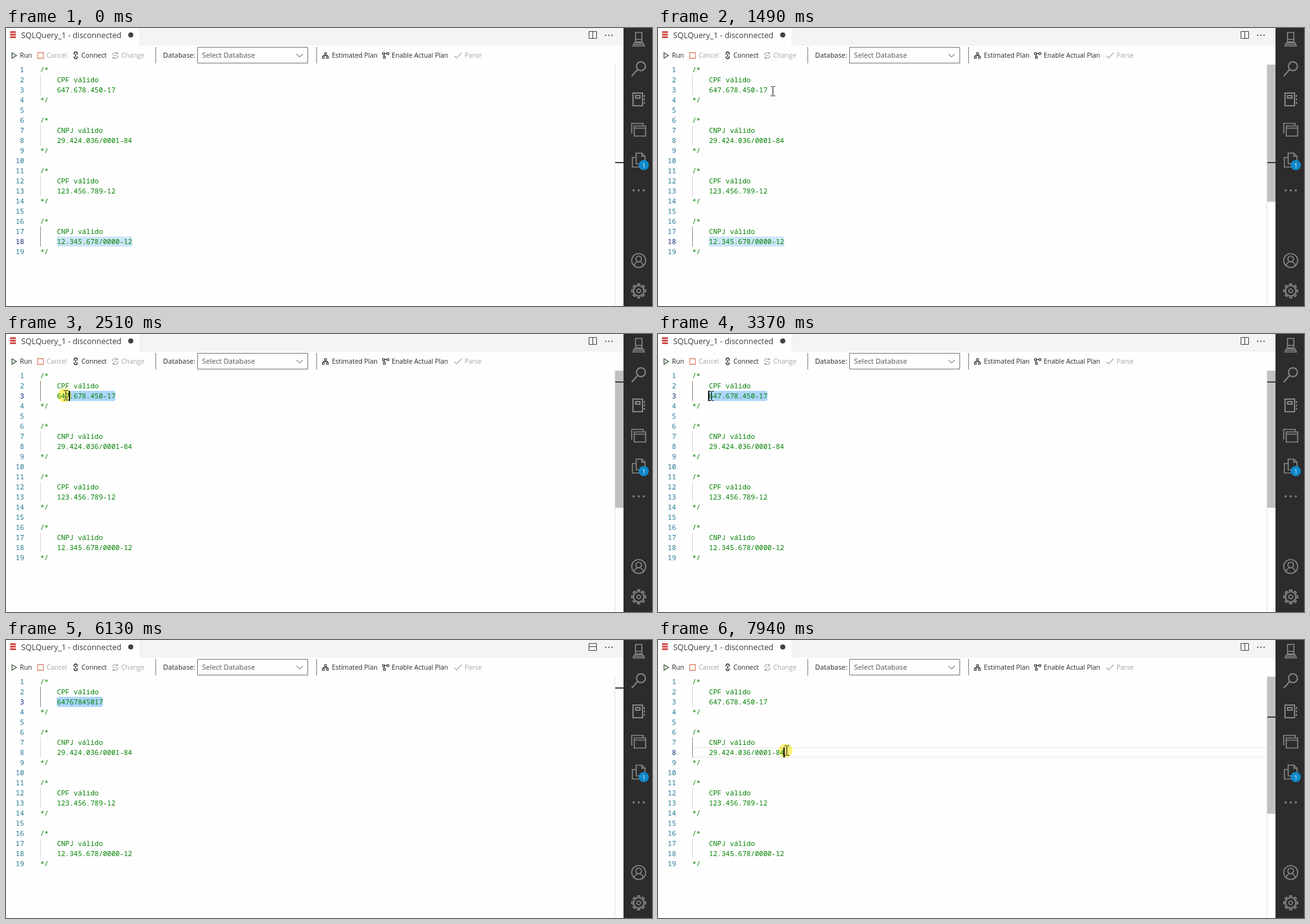
These frames come from a looping animation (1020x440 px, 8000 ms). An HTML page with a canvas:

```html
<!DOCTYPE html>
<html lang="pt">
<head>
<meta charset="utf-8">
<title>SQL editor</title>
<style>
html, body { margin: 0; width: 100%; height: 100%; overflow: hidden; background: #fefefe; }
canvas { display: block; }
</style>
</head>
<body>
<canvas id="stage" width="1020" height="440"></canvas>
<script>
const ctx = document.getElementById('stage').getContext('2d');
const LOOP = 8000, LEFT = 80.4, CHAR = 6.6, END_COL = 14;
const UI = '"Open Sans", "Noto Sans", sans-serif';
const MONO = '11px "Noto Sans Mono", "DejaVu Sans Mono", monospace';
const TIME = { enter: 460, click: 1710, drag: 1900, dragEnd: 2650, release: 3110,
  strip: 4430, leave: 5450, alt: 5860, restore: 6600, altUp: 6800, back: 7060, click2: 7940 };
const DOTTED = '647.678.450-17', PLAIN = '64767845017';
const BLOCKS = [['CPF', DOTTED], ['CNPJ', '29.424.036/0001-84'],
  ['CPF', '123.456.789-12'], ['CNPJ', '12.345.678/0000-12']];

const PATHS = [
  [[460, 255, 374], [700, 225, 250], [950, 200, 140], [1220, 188, 104], [1490, 181, 100],
   [1580, 180, 100], [1710, 174, 99], [1860, 174, 98], [1970, 162, 99], [2040, 150, 98],
   [2510, 94, 97], [2650, 82, 97], [3370, 84, 98], [3510, 89, 106], [4650, 89, 106],
   [4910, 88, 109], [5240, 88, 109], [5310, 105, 200], [5380, 125, 335], [5450, 125, 335]],
  [[7060, 205, 432], [7200, 208, 340], [7400, 206, 225], [7610, 203, 175], [8000, 203, 175]]
];

const between = (t, a, b) => t >= a && t < b;
const clamp = (v, lo, hi) => Math.min(hi, Math.max(lo, v));
const rowTop = line => 58 + (line - 1) * 16;
const rulerY = line => 58 + (line - 1) * 9.1;

function pointerAt(t) {
  for (const path of PATHS) {
    for (let i = 1; i < path.length; i++) {
      const [t0, x0, y0] = path[i - 1], [t1, x1, y1] = path[i];
      if (between(t, t0, t1)) {
        const k = (t - t0) / (t1 - t0);
        return [x0 + (x1 - x0) * k, y0 + (y1 - y0) * k];
      }
    }
  }
  return null;
}

function box(x, y, w, h, color) {
  ctx.fillStyle = color;
  ctx.fillRect(x, y, w, h);
}

function rounded(x, y, w, h, color, r = 3) {
  ctx.fillStyle = color;
  ctx.beginPath();
  ctx.roundRect(x, y, w, h, r);
  ctx.fill();
}

function disc(x, y, r, color) {
  ctx.fillStyle = color;
  ctx.beginPath();
  ctx.arc(x, y, r, 0, 7);
  ctx.fill();
}

function stroke(d, color, width = 1, dx = 0, dy = 0) {
  ctx.save();
  ctx.translate(dx, dy);
  ctx.strokeStyle = color;
  ctx.lineWidth = width;
  ctx.stroke(new Path2D(d));
  ctx.restore();
}

function text(str, x, y, color, font, align = 'left') {
  ctx.font = font;
  ctx.fillStyle = color;
  ctx.textAlign = align;
  ctx.fillText(str, x, y);
}

const label = (str, x, color, size = 10.4) => text(str, x, 47, color, `${size}px ${UI}`);

function drawTabs(t) {
  box(0, 0, 975, 28, '#f4f4f4');
  box(0, 0, 211, 28, '#fefefe');
  box(211, 0, 1, 28, '#ececec');
  for (const y of [5, 9, 13]) rounded(6, y, 10, 3, '#d2504c', 1.5);
  text('SQLQuery_1 - disconnected', 24, 16, '#3c3c3c', `12.4px ${UI}`);
  disc(197, 11, 4, '#424242');
  stroke('M920.5 5.5h12v11h-12z', '#424242');
  stroke(between(t, TIME.alt, TIME.altUp) ? 'M920 10.5h13' : 'M926.5 5v12', '#424242');
  for (const x of [947, 952, 957]) disc(x, 11.5, 1.1, '#424242');
}

function drawToolbar() {
  const dark = '#2a2a2a', pale = '#a6a6a6';
  stroke('M9.5 39.2L16.5 43.5L9.5 47.8z', '#3f5a3f', 1.3);
  label('Run', 22, dark);
  stroke('M50 39h9v9h-9z', '#df8670', 1.3);
  label('Cancel', 64, pale);
  stroke('M107.5 42v-1.5a2.5 2.5 0 0 1 5 0v1.5M107.5 45v1a2.5 2.5 0 0 0 5 0v-1M110 41v5', dark, 1.3);
  label('Connect', 119, dark);
  stroke('M168 43a4.5 4.5 0 0 1 8-2.5v-2.5M176 40.5h-3M177 44a4.5 4.5 0 0 1-8 2.5v2.5M169 46.5h3M170 43.5h5', pale, 1.2);
  label('Change', 182, pale);
  stroke('M236.5 30v26M490.5 30v26', '#7c7c7c');
  label('Database:', 248, dark, 10.9);
  stroke('M302.5 30.5h174v25h-174z', '#767676');
  label('Select Database', 309.5, '#555', 11.3);
  stroke('M458.5 41l5 5l5-5', '#444');
  stroke('M503 39h3v3h-3zM499.5 45h3v3h-3zM506 45h3v3h-3zM504.5 42v2M501 45v-1.5h6.5v1.5', dark, 1.1);
  label('Estimated Plan', 514.5, dark);
  stroke('M594.5 39h3v3h-3zM601.5 39h3v3h-3zM596 45h3v3h-3zM598 40.5h3M596.5 42l1 3', dark, 1.1);
  label('Enable Actual Plan', 609, dark);
  stroke('M708 44l3.5 3.5l8-8.5', pale, 1.1);
  label('Parse', 724, pale);
}

function drawSidebar() {
  const gray = '#858585';
  const icon = (d, x, y, w = 1.7) => stroke(d, gray, w, x, y);
  box(975, 0, 45, 440, '#2c2c2c');
  icon('M-5-11h10v15h-10zM-9 10.5h18l-2-5h-14zM-5 0h10M-7 8h14', 999, 18);
  icon('M10.5-4.5a7 7 0 1 1-14 0a7 7 0 1 1 14 0zM-1.5.5L-11 11', 999, 65, 2);
  icon('M-9-10h15v20h-15zM-5-6h7v4h-7zM9-7v3M9-1.5v3M9 4v3', 999, 113, 2);
  icon('M-11 6v-16h18v3M-7-6h18v16h-18zM-7-2.5h18', 999, 161);
  icon('M-4-11h9l5 5v12h-14zM5-11v5h5M-4-4h-6v15h11v-5', 999, 209);
  disc(1007, 217, 8, '#1089cb');
  text('1', 1007, 220.5, '#fff', `9px ${UI}`, 'center');
  for (const x of [991, 999, 1007]) disc(x, 257, 1.7, gray);
  icon('M11 0a11 11 0 1 1-22 0a11 11 0 1 1 22 0zM4.5-2.5a4.5 4.5 0 1 1-9 0a4.5 4.5 0 1 1 9 0zM-7 8c1-8 13-8 14 0', 999, 368);
  ctx.save();
  ctx.translate(999, 416);
  for (let i = 0; i < 8; i++) {
    stroke('M-2-8l.6-3h2.8l.6 3', gray, 1.8);
    ctx.rotate(Math.PI / 4);
  }
  ctx.restore();
  icon('M8 0a8 8 0 1 1-16 0a8 8 0 1 1 16 0zM3 0a3 3 0 1 1-6 0a3 3 0 1 1 6 0z', 999, 416);
}

// Selection follows the pointer with a small delay.
function editorState(t) {
  const line = t < TIME.click ? 18 : t < TIME.click2 ? 3 : 8;
  const value = between(t, TIME.strip, TIME.restore) ? PLAIN : DOTTED;
  let col = END_COL;
  if (between(t, TIME.drag, TIME.dragEnd)) {
    col = clamp(Math.round((pointerAt(t - 60)[0] - LEFT) / CHAR), 0, END_COL);
  } else if (between(t, TIME.dragEnd, TIME.click2)) {
    col = 0;
  }
  return { line, value, col };
}

function caretVisible(t) {
  if (t < TIME.click) return false;
  if (t < 3470 || t >= TIME.click2) return true;
  return [[3970, 4910], [5450, 6000], [6460, 7060]].some(([a, b]) => between(t, a, b));
}

function drawHighlights({ line, value, col }) {
  if (line === 18) rounded(LEFT - .4, 330, 119.5, 16, '#cde6f8');
  if (line === 8 || (line === 3 && col === END_COL)) {
    ctx.strokeStyle = '#e4e4e4';
    ctx.lineWidth = 1;
    ctx.strokeRect(54.5, rowTop(line) + .5, 907, 15);
  }
  if (line !== 3 || col === END_COL) return;
  const mark = (row, c) => rounded(LEFT + c * CHAR, rowTop(row), CHAR, 16, '#e2f0fb');
  if (col === END_COL - 1) {
    mark(3, 2);
    mark(3, 5);
    mark(13, 8);
    mark(18, 8);
  }
  rounded(LEFT - .4 + col * CHAR, rowTop(3), (value.length - col) * CHAR + .4, 16, '#add6ff');
}

function drawCode({ line, value }) {
  for (let n = 1; n <= 19; n++) {
    text(n, 28.5, rowTop(n) + 12, n === line ? '#0b216f' : '#237893', MONO, 'right');
  }
  BLOCKS.forEach(([kind, number], i) => {
    const first = i * 5 + 1, y = rowTop(first);
    const active = line > first && line < first + 3;
    box(54, y + 16, 1, 32, active ? '#8c8782' : '#d6d6d6');
    const rows = [['/*', 54], [kind + ' válido', LEFT], [i ? number : value, LEFT], ['*/', 54]];
    rows.forEach(([str, x], r) => text(str, x, y + r * 16 + 12, '#008000', MONO));
  });
}

function drawScrollbar(t, { line, col }) {
  box(961, 58, 1, 382, '#e2e2e2');
  const fadeIn = from => clamp((t - from) / 100, 0, 1);
  const shown = t < TIME.leave ? fadeIn(TIME.enter) * clamp((TIME.leave - t) / 70, 0, 1) : fadeIn(TIME.back);
  ctx.globalAlpha = shown;
  box(962, 58, 13, 217, '#c1c1c1');
  ctx.globalAlpha = 1;
  if (line === 3 && col === END_COL - 1) {
    for (const n of [3, 13, 18]) box(966, rulerY(n) + .5, 5, 9, '#a2a2a2');
  }
  box(962, Math.round(rulerY(line)) - 1, 13, 2, '#424242');
}

function drawPointer(t) {
  const at = pointerAt(t);
  if (!at) return;
  const [x, y] = at.map(Math.round);
  if (between(t, TIME.click, TIME.release) || t >= TIME.click2) {
    ctx.globalCompositeOperation = 'multiply';
    disc(x - 1.5, y, 10.8, '#fff476');
    ctx.globalCompositeOperation = 'source-over';
  }
  stroke('M-3-7.5h2.5l1 1l1-1h2.5M.5-6.5v13M-3 7.5h2.5l1-1l1 1h2.5', '#111', 1, x, y);
}

function draw(t) {
  const state = editorState(t);
  box(0, 0, 1020, 440, '#fefefe');
  drawTabs(t);
  drawToolbar();
  drawHighlights(state);
  drawCode(state);
  if (caretVisible(t)) {
    const col = state.line === 8 ? 18 : state.col;
    box(Math.round(LEFT + col * CHAR) - 1, rowTop(state.line), 2, 16, '#111');
  }
  drawScrollbar(t, state);
  drawPointer(t);
  drawSidebar();
}

const began = performance.now();
function tick() {
  draw((performance.now() - began) % LOOP);
  requestAnimationFrame(tick);
}
tick();
</script>
</body>
</html>
```
